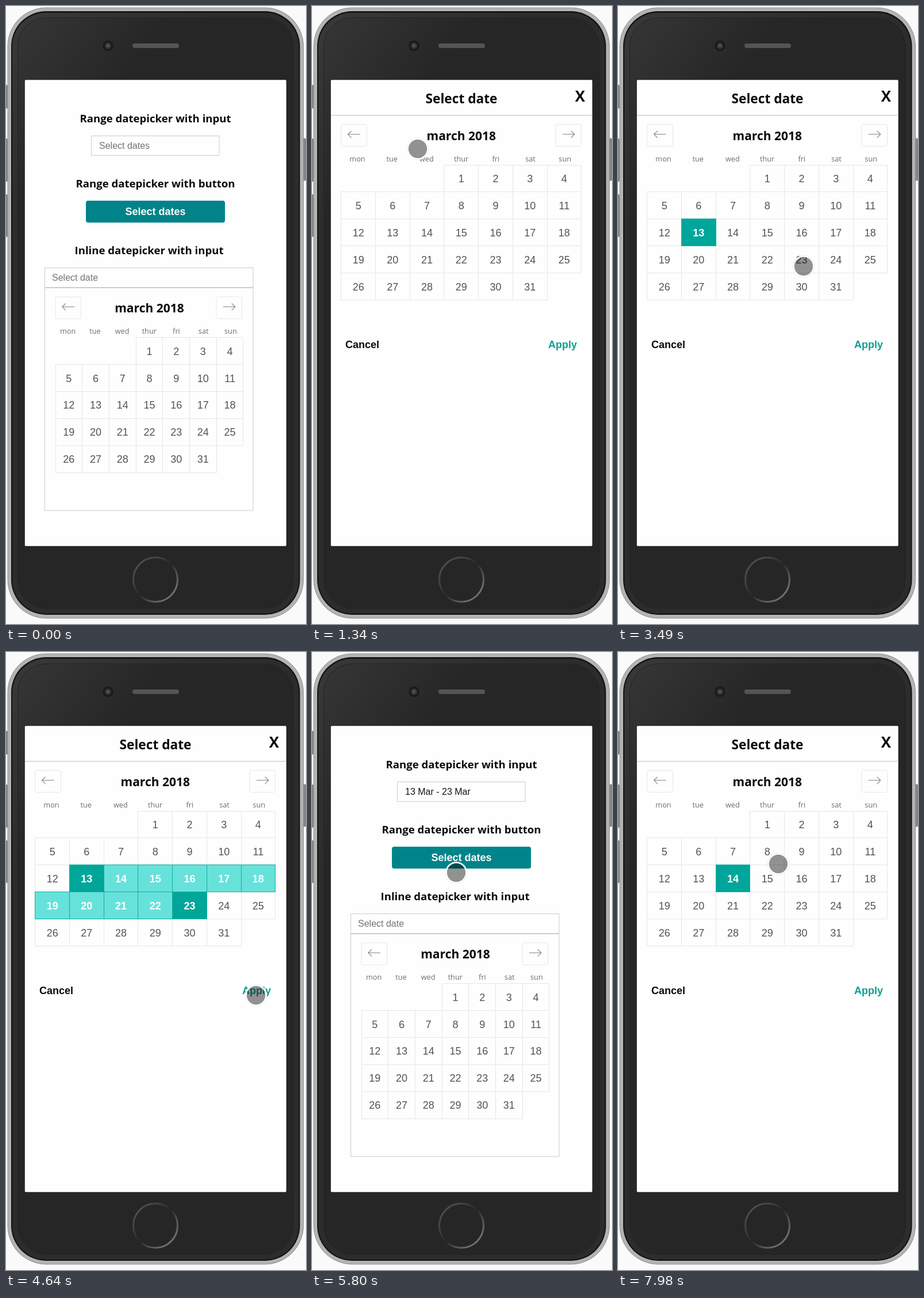
Recreate the animation shown at these times as an HTML page with a canvas. Size 522 px wide and 1073 px high, loop 8000 ms.

```html
<!DOCTYPE html>
<html lang="en">
<head>
<meta charset="utf-8">
<title>Date range picker</title>
<style>
html, body { margin: 0; width: 100%; height: 100%; overflow: hidden; background: #fafafa; }
canvas { display: block; width: 522px; height: 1073px; }
</style>
</head>
<body>
<canvas id="stage"></canvas>
<script>
const W = 522, H = 1073, LOOP = 8000, STEP = 74.3;
const canvas = document.getElementById('stage');
const ctx = canvas.getContext('2d');
const dpr = window.devicePixelRatio || 1;
canvas.width = W * dpr;
canvas.height = H * dpr;

const SANS = '"Liberation Sans", Arial, sans-serif';
const HUMAN = '"Open Sans", "Noto Sans", sans-serif';
const TEAL = '#00a699', LINE = '#e4e7e7', FIELD = '#cacccd';
const DAYS = ['mon', 'tue', 'wed', 'thur', 'fri', 'sat', 'sun'];

// Each move runs from the end of the one before: start, end, then x, y pairs.
const ENTRY = { x: 456, y: 1160 };
const moves = [];
function move(start, end, ...coords) {
  const path = [moves.length ? moves[moves.length - 1].path.slice(-1)[0] : ENTRY];
  for (let i = 0; i < coords.length; i += 2) path.push({ x: coords[i], y: coords[i + 1] });
  moves.push({ start, end, path, steps: Math.round((end - start) / STEP) + 1 });
}
const jump = (time, x, y) => move(time, time, x, y);

move(110, 720, 385, 850, 152, 290, 184, 248);
move(1420, 1660, 160, 350, 135, 440);
jump(1910, 147, 397);
jump(2060, 154, 372);
move(2350, 2510, 154, 387);
move(2780, 3490, 235, 420, 323, 452);
move(3870, 4100, 385, 560, 436, 649);
move(4250, 4640, 435, 596);
move(5100, 5650, 352, 538, 251, 371);
jump(5800, 251, 383);
move(5970, 6040, 251, 371);
jump(6210, 251, 370);
move(6510, 7130, 236, 530, 208, 475, 197, 419);
move(7280, 7680, 190, 408);
jump(7830, 189, 409);
jump(7980, 279, 368);

function touchAt(t) {
  const m = moves.filter(m => m.start <= t).pop();
  if (!m) return null;
  const { start, end, path, steps } = m;
  const done = t >= end ? steps
    : 1 + Math.floor((t - start) / (end - start) * (steps - 1) + 0.01);
  const u = done / steps * (path.length - 1);
  const i = Math.min(Math.floor(u), path.length - 2);
  const a = path[i], b = path[i + 1], f = u - i;
  return [a.x + (b.x - a.x) * f, a.y + (b.y - a.y) * f];
}

function paint(fill, stroke, width) {
  if (fill) { ctx.fillStyle = fill; ctx.fill(); }
  if (stroke) { ctx.strokeStyle = stroke; ctx.lineWidth = width; ctx.stroke(); }
}

function box(x, y, w, h, r, fill, stroke, width = 1) {
  ctx.beginPath();
  ctx.roundRect(x, y, w, h, r);
  paint(fill, stroke, width);
}

function disc(x, y, r, fill, stroke, width = 1) {
  ctx.beginPath();
  ctx.arc(x, y, r, 0, 7);
  paint(fill, stroke, width);
}

function text(str, x, y, font, color, align = 'left') {
  ctx.font = font;
  ctx.fillStyle = color;
  ctx.textAlign = align;
  ctx.fillText(str, x, y);
}

function gradient(x0, y0, x1, y1, ...colors) {
  const g = ctx.createLinearGradient(x0, y0, x1, y1);
  colors.forEach((c, i) => g.addColorStop(i / (colors.length - 1), c));
  return g;
}

function phone() {
  ctx.fillStyle = '#fafafa';
  ctx.fillRect(0, 0, W, H);
  const sideKey = (x, y, h) => box(x, y, 6, h, 2, '#858585');
  sideKey(-3, 137, 41);
  sideKey(-3, 230, 75);
  sideKey(-3, 327, 74);
  sideKey(516, 229.5, 74);

  box(3, 3, 514.5, 1060, 67, '#b3b3b3', '#8e8e8e');
  box(9, 9, 502.5, 1048, 61, '#111111');
  box(11, 11.5, 498.5, 1043.5, 59, gradient(11, 11, 200, 200, '#393939', '#2c2c2c'));
  box(20.5, 20.5, 479.5, 1025.5, 50, gradient(20, 20, 190, 150, '#363636', '#262626'), '#232323');

  disc(177.5, 69, 9.5, '#1d1d1d');
  disc(177.5, 69, 6.5, '#2c2c2c', '#111');
  disc(177.5, 69, 3.7, '#2a2a2a', '#565656');
  disc(177.5, 69, 1.4, '#888');

  ctx.save();
  box(220, 65, 81, 8, 4, '#343434');
  ctx.clip();
  ctx.fillStyle = '#747474';
  for (let y = 0; y < 8; y++)
    for (let x = y % 2; x < 81; x += 2) ctx.fillRect(220 + x, 65 + y, 1, 1);
  ctx.restore();

  disc(260, 996, 38.5, null,
    gradient(232, 968, 288, 1024, '#4e4e4e', '#404040', '#262626', '#555', '#727272'), 3);
  box(32.5, 128, 455.5, 810, 2, '#fefefe', '#161616', 0.6);
}

function navButton(x, y, dir) {
  box(x, y, 44.5, 38, 3, '#fefefe', LINE);
  const cx = x + 22.3, cy = y + 17.3, tip = cx + dir * 10.5;
  ctx.beginPath();
  ctx.moveTo(cx - dir * 10.5, cy);
  ctx.lineTo(tip, cy);
  ctx.moveTo(tip - dir * 6, cy - 6);
  ctx.lineTo(tip, cy);
  ctx.lineTo(tip - dir * 6, cy + 6);
  paint(null, '#7b8082', 1.1);
}

function calendar(left, top, cellW, navRight, picked = {}) {
  const cellH = 46.9, snap = v => Math.floor(v) + 0.5;
  const { from, to, filled } = picked;
  navButton(left, top - 70.5, -1);
  navButton(navRight - 44.5, top - 70.5, 1);
  text('march 2018', left + cellW * 3.5, top - 43.5, `700 21px ${HUMAN}`, '#0a0a0a', 'center');
  DAYS.forEach((d, i) => text(d, left + cellW / 2 - 1.7 + i * (cellW + 0.5), top - 6.5,
    `400 12.7px ${HUMAN}`, '#6a6d6e', 'center'));

  const isEnd = d => d === from || d === to;
  const inRange = d => filled && d > from && d < to;
  const cell = d => {
    const slot = d + 2, col = slot % 7, row = Math.floor(slot / 7);
    const x = snap(left + col * cellW), y = snap(top + row * cellH);
    const w = snap(left + (col + 1) * cellW) - x, h = snap(top + (row + 1) * cellH) - y;
    const on = isEnd(d) || inRange(d);
    const fill = isEnd(d) ? TEAL : inRange(d) ? '#66e2da' : '#fefefe';
    box(x, y, w, h, 0, fill, on ? '#14ab9f' : LINE);
    text(d, left + (col + 0.5) * cellW, top + (row + 0.5) * cellH + 6.7,
      `${on ? 700 : 400} 18px ${SANS}`, on ? '#fff' : '#505455', 'center');
  };
  const all = Array.from({ length: 31 }, (_, i) => i + 1);
  all.filter(d => !isEnd(d) && !inRange(d)).forEach(cell);
  all.filter(inRange).forEach(cell);
  all.filter(isEnd).forEach(cell);
}

function formScreen(dates) {
  const heading = (str, x, y) => text(str, x, y, `700 18.6px ${HUMAN}`, '#0a0a0a', 'center');
  heading('Range datepicker with input', 260, 202);
  box(148.5, 225.5, 222.5, 34, 0, '#fefefe', FIELD);
  text(dates || 'Select dates', 162, 247.5, `16px ${SANS}`, dates ? '#151515' : '#757575');

  heading('Range datepicker with button', 260, 315);
  box(139, 338, 242, 38, 4, '#008489');
  text('Select dates', 260, 362.5, `700 18px ${SANS}`, '#fff', 'center');

  heading('Inline datepicker with input', 249, 431);
  box(67.5, 488.5, 362.5, 387.5, 0, '#fefefe', FIELD);
  box(67.5, 454.5, 362.5, 34, 0, '#fefefe', FIELD);
  ctx.fillStyle = FIELD;
  ctx.fillRect(67, 488, 363, 2);
  text('Select date', 80, 476.5, `16px ${SANS}`, '#757575');
  calendar(86, 575.5, 46.7, 410.5);
}

function pickerScreen(picked) {
  text('Select date', 260, 168.5, `700 22.7px ${HUMAN}`, '#0a0a0a', 'center');
  text('X', 466.5, 166, `700 26px ${HUMAN}`, '#0a0a0a', 'center');
  ctx.fillStyle = '#cfd1d2';
  ctx.fillRect(33, 189, 455, 1.5);
  calendar(50.8, 276, 59.7, 468.5, picked);
  text('Cancel', 58, 594, `700 18px ${SANS}`, '#0a0a0a');
  text('Apply', 411, 594, `700 18px ${SANS}`, '#0aa192');
}

function touch(x, y) {
  disc(x, y, 16.5, 'rgba(0,0,0,0.43)');
  disc(x, y, 17.6, null, '#fff', 2.8);
  disc(x, y, 18.8, null, 'rgba(0,0,0,0.1)', 0.8);
}

function selection(t) {
  if (t >= 7830) return { from: 14 };
  if (t < 2780 || t >= 5020) return {};
  return { from: 13, to: t >= 3720 ? 23 : undefined, filled: t >= 3870 };
}

function draw(t) {
  ctx.setTransform(dpr, 0, 0, dpr, 0, 0);
  phone();
  const picking = (t >= 1180 && t < 5020) || t >= 6510;
  if (picking) pickerScreen(selection(t));
  else formScreen(t >= 5020 ? '13 Mar - 23 Mar' : '');
  const at = touchAt(t);
  if (at) touch(...at);
}

const begin = performance.now();
function frame() {
  draw((performance.now() - begin) % LOOP);
  requestAnimationFrame(frame);
}
frame();
</script>
</body>
</html>
```
